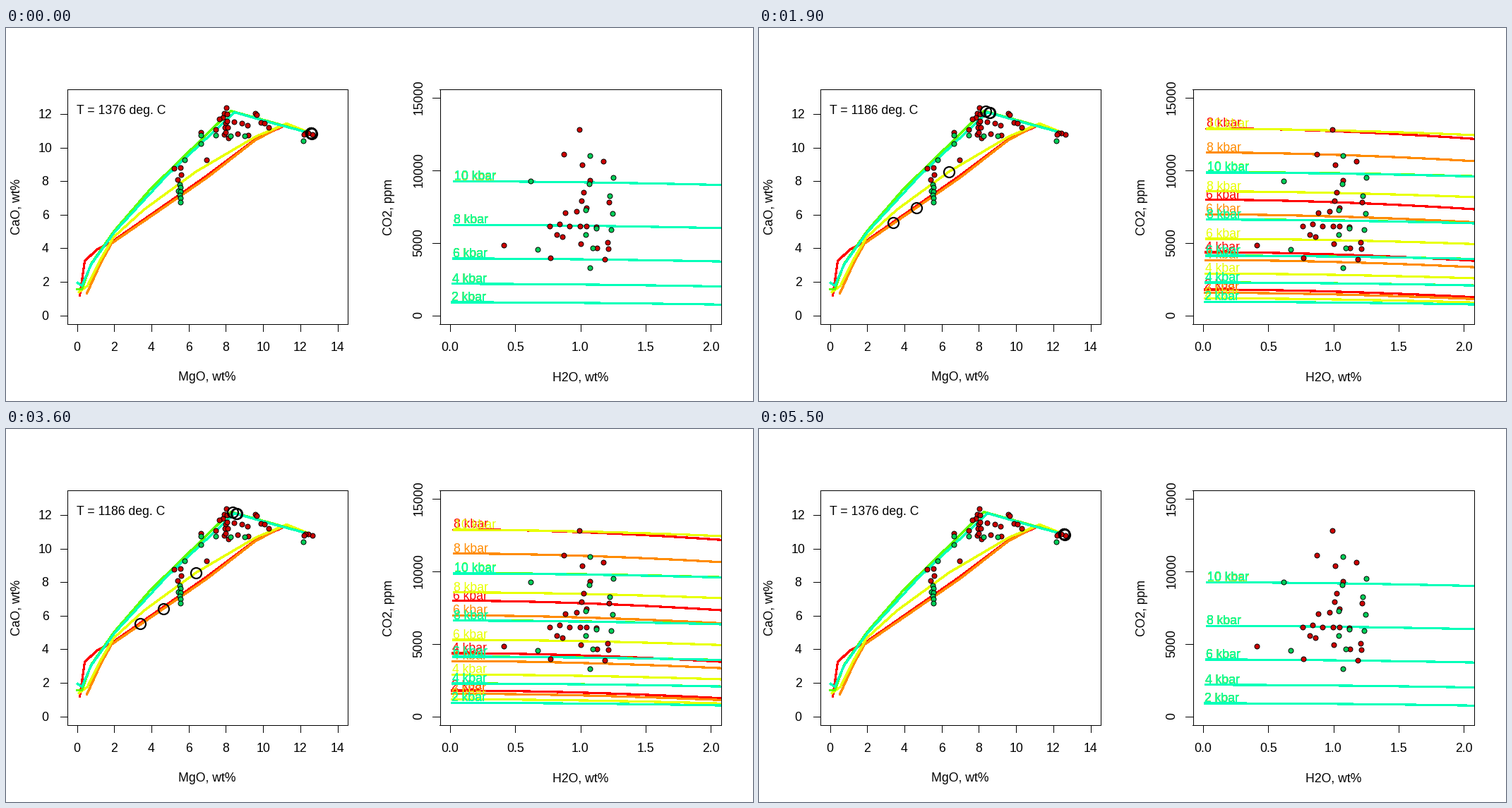
Animation, 1058 px wide and 529 px high, one loop 5.6 s. Source, as a matplotlib script:

```python
import colorsys

import matplotlib.pyplot as plt
import numpy as np
from matplotlib.animation import FuncAnimation

W, H, DPI = 1058, 529, 72  # at 72 dpi one point is one pixel
FRAMES, INTERVAL = 56, 100
FONT = 17.6
RED, GREEN = "#cd0000", "#00cd57"
PRESSURES = (10, 8, 6, 4, 2)

plt.rcParams["font.family"] = "Liberation Sans"
plt.rcParams["lines.antialiased"] = False
rng = np.random.default_rng(4)

# Liquid lines of descent, in stage pixels
RED_PATH = [(433, 150), (397, 138), (354, 158), (285, 210), (150, 304),
            (129, 315), (112, 331), (105, 380)]
ORANGE_PATH = [(433, 150), (394, 138), (353, 160), (285, 213), (150, 306),
               (135, 333), (115, 377)]
YELLOW_PATH = [(433, 150), (398, 136), (355, 154), (270, 204), (196, 258),
               (153, 297), (133, 331), (116, 366), (104, 375)]
GREEN_PATH = [(433, 150), (380, 135), (319, 118), (205, 229), (154, 288),
              (121, 335), (108, 371), (101, 371)]
TEAL_PATH = [(433, 150), (380, 136), (324, 120), (227, 211), (154, 290),
             (121, 336), (108, 366), (102, 362)]

# Per liquid: path, ring x and isobar growth at the key steps, pressure effect
KEY_STEPS = (0, 8, 19, 27)
LIQUIDS = [(RED_PATH, (433, 336, 190, 129), (0, .213, 1.066, 2.07), .014),
           (ORANGE_PATH, (433, 353, 223, 152), (0, .172, .80, 1.64), .014),
           (YELLOW_PATH, (433, 376, 270, 196), (0, .108, .37, .80), .03),
           (GREEN_PATH, (433, 392, 322, 233), (0, .03, .06, .266), .0715),
           (TEAL_PATH, (433, 406, 327, 227), (0, .026, .058, .275), .0715),
           (TEAL_PATH, (433, 421, 327, 227), (0, .022, .058, .28), .0715)]
COLORS = [colorsys.hsv_to_rgb(i / 11, 1, 1) for i in range(len(LIQUIDS))]

# Sample groups: count, first point, last point, jitter
LEFT_RED = [(9, (309, 113), (313, 153), 4), (5, (304, 131), (342, 137), 2),
            (5, (355, 121), (368, 140), 5), (4, (298, 146), (342, 154), 2),
            (2, (276, 148), (284, 187), 0), (4, (245, 195), (243, 217), 6),
            (4, (433, 150), (421, 150), 2)]
LEFT_GREEN = [(4, (277, 153), (338, 153), 1), (2, (276, 164), (253, 187), 0),
              (7, (246, 222), (248, 248), 3), (1, (421, 160), (421, 160), 0)]
RIGHT_RED = [(2, (812, 144), (790, 179), 0), (2, (846, 189), (816, 194), 0),
             (4, (826, 217), (808, 262), 3), (3, (793, 261), (853, 247), 2),
             (6, (773, 279), (836, 282), 3), (2, (780, 293), (788, 296), 0),
             (2, (814, 306), (837, 312), 0), (3, (854, 303), (850, 327), 2),
             (2, (706, 308), (771, 326), 0)]
RIGHT_GREEN = [(4, (826, 182), (820, 294), 3), (4, (859, 214), (856, 286), 3),
               (2, (744, 217), (754, 314), 0), (3, (836, 284), (827, 340), 0)]

fig = plt.figure(figsize=(W / DPI, H / DPI), dpi=DPI, facecolor="white")


def make_panel(left, right, top=87, bottom=420):
    """Axes whose data units are stage pixels, y pointing down."""
    ax = fig.add_axes([(left - .5) / W, 1 - (bottom - .5) / H,
                       (right - left) / W, (bottom - top) / H])
    ax.set(xlim=(left, right), ylim=(bottom, top), xticks=[], yticks=[])
    for spine in ax.spines.values():
        spine.set_linewidth(1)
    return ax


def write(ax, x, y, text, **style):
    style = {"ha": "center", "va": "baseline", "fontsize": FONT,
             "rotation_mode": "anchor", **style}
    return ax.text(x, y, text, **style)


def tick(ax, xs, ys):
    ax.plot(xs, ys, color="black", lw=1, clip_on=False, solid_capstyle="butt")


def x_axis(ax, ticks, title):
    for x, text in ticks:
        tick(ax, [x, x], [420, 430])
        write(ax, x, 459, text)
    write(ax, sum(ax.get_xlim()) / 2, 501, title)


def y_axis(ax, ticks, title, rotation):
    edge = ax.get_xlim()[0]
    for y, text in ticks:
        tick(ax, [edge - 10, edge], [y, y])
        if rotation:
            write(ax, edge - 25, y, text, rotation=rotation)
        else:
            write(ax, edge - 31, y + 6, text)
    write(ax, edge - 67, 254, title, rotation=90)


def scatter(ax, groups, color):
    for count, first, last, jitter in groups:
        x, y = np.linspace(first, last, count).T + rng.uniform(-jitter, jitter, (2, count))
        ax.plot(x, y, "o", ms=7, mfc=color, mec="black", mew=1, zorder=5,
                antialiased=True)


def ease(step, keys):
    """Smooth cubic through the values at the key steps."""
    return np.polyval(np.polyfit(KEY_STEPS, keys, 3), step)


def isobar(pressure, growth, effect):
    """Height of an isobar at its dry end and its drop at the wet end."""
    base = pressure * (7.7 + .69 * pressure + .044 * pressure ** 2)
    height = base * (1 + growth * (1 + effect * (pressure - 8)))
    return height, 2.8 + .23 * pressure + growth * (6.3 + .4 * pressure)


left = make_panel(87, 484)
x_axis(left, [(101 + 26.36 * v, str(v)) for v in range(0, 15, 2)], "MgO, wt%")
y_axis(left, [(408 - 23.79 * v, str(v)) for v in range(0, 13, 2)], "CaO, wt%", 0)

right = make_panel(615, 1013)
x_axis(right, [(629.5 + 184.5 * v, f"{v:.1f}") for v in (0, .5, 1, 1.5, 2)], "H2O, wt%")
y_axis(right, [(408 - .0206 * v, str(v)) for v in range(0, 15001, 5000)], "CO2, ppm", 90)

scatter(left, LEFT_RED, RED)
scatter(left, LEFT_GREEN, GREEN)
scatter(right, RIGHT_RED, RED)
scatter(right, RIGHT_GREEN, GREEN)

temperature = write(left, 101, 123, "", ha="left")
rings, = left.plot([], [], "o", ms=15, mfc="none", mec="black", mew=2.2,
                   zorder=6, antialiased=True)

ramp = np.linspace(0, 1, 40)
isobars = {}
for i, (liquid, color) in enumerate(zip(LIQUIDS, COLORS)):
    left.plot(*zip(*liquid[0]), color=color, lw=2.2, zorder=2)
    for p in PRESSURES:
        start = 631 + .45 * p
        line, = right.plot(start + (1013 - start) * ramp, 0 * ramp,
                           color=color, lw=2.2, zorder=2 + i / 10)
        label = write(right, start, 0, f"{p} kbar", ha="left", color=color,
                      zorder=2.05 + i / 10, clip_on=True)
        isobars[i, p] = line, label


def update(frame):
    step = min(frame, FRAMES - 1 - frame)
    temperature.set_text(f"T = {1376 - 10 * step} deg. C")

    ring_points = []
    for i, (path, ring_keys, growth_keys, effect) in enumerate(LIQUIDS):
        x = ease(step, ring_keys)
        ring_points.append((x, np.interp(x, *zip(*path[::-1]))))
        growth = ease(step, growth_keys)
        for p in PRESSURES:
            line, label = isobars[i, p]
            height, drop = isobar(p, growth, effect)
            line.set_ydata(408 - height + drop * ramp ** 1.8)
            label.set_y(406 - height)
    rings.set_data(*zip(*ring_points))
    return []


animation = FuncAnimation(fig, update, frames=FRAMES, interval=INTERVAL,
                          repeat=True, repeat_delay=0)
plt.show()
```
